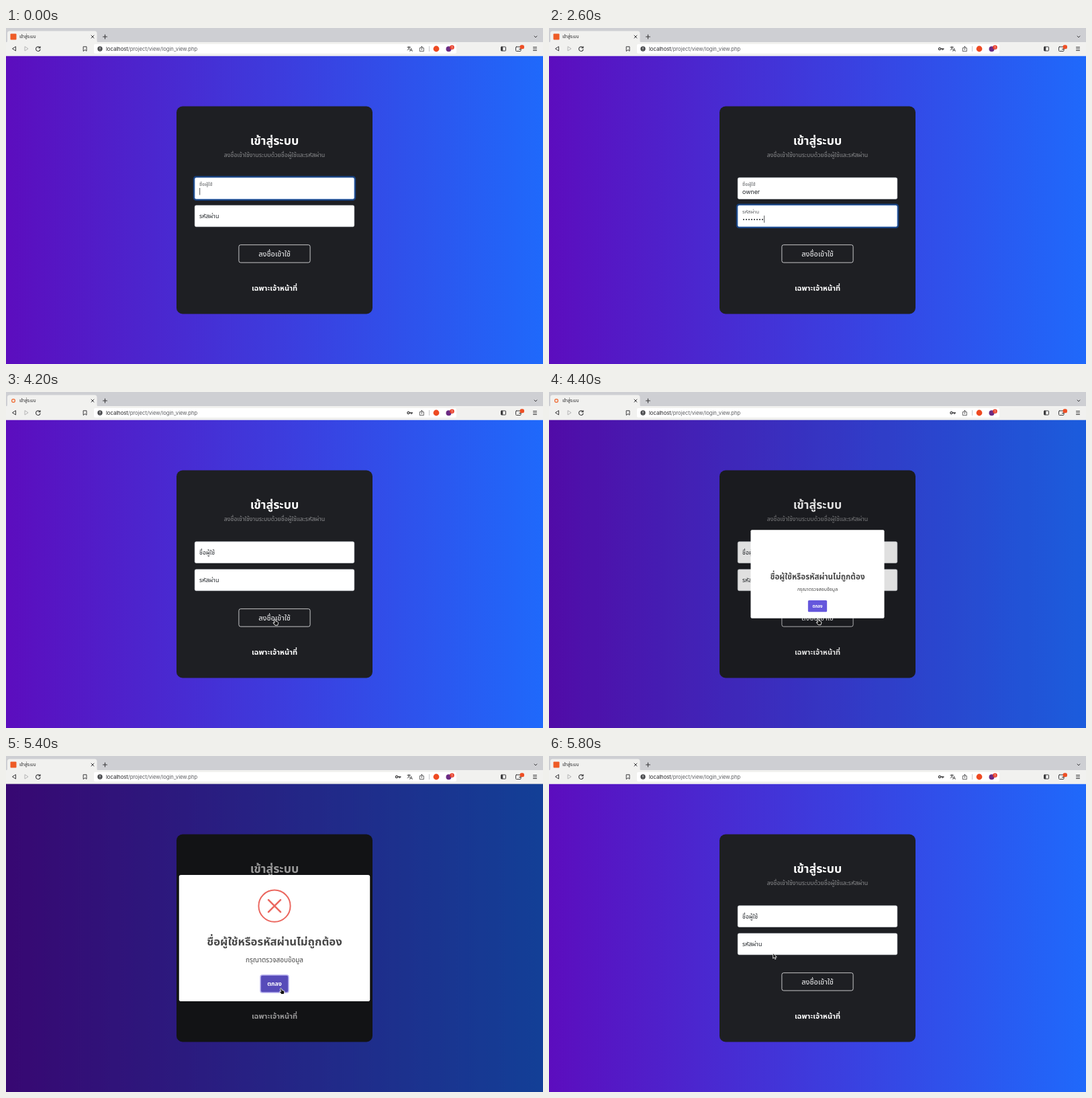
These frames come from a looping animation (800 by 500 pixels, 6000 ms). An HTML page:

```html
<!DOCTYPE html>
<html lang="th">
<head>
<meta charset="utf-8">
<title>เข้าสู่ระบบ</title>
<style>
html, body { margin: 0; width: 100%; height: 100%; overflow: hidden; }
svg { display: block; width: 800px; height: 500px; }
text { font-family: "Noto Sans Thai Looped", "Noto Sans Thai", "Noto Sans", sans-serif; }
.ui { font-family: Inter, Roboto, sans-serif; }
.mid { text-anchor: middle; }
.line { fill: none; stroke: #3b3b3d; stroke-width: 1; stroke-linecap: round; stroke-linejoin: round; }
</style>
</head>
<body>
<svg id="stage" viewBox="0 0 800 500"></svg>
<script>
const LOOP = 6000, STEP = 200;
const USER = 'owner', SECRET = 10;

// Pointer path: time, x, y, shape
const PATH = [
  [1200, 390, 262, 'beam'], [1400, 362, 276, 'beam'], [1600, 358, 284, 'beam'], [1800, 358, 284, ''],
  [3000, 358, 284, 'beam'], [3200, 374, 304, 'arrow'], [3400, 392, 313, 'arrow'],
  [3600, 400, 349.5, 'hand'], [3800, 401, 344, 'hand'], [4400, 402, 342, 'hand'],
  [4800, 402, 342, 'hand'], [5400, 411, 350, 'hand'], [5600, 412, 350, 'arrow'], [5800, 336, 298, 'arrow']
];

const clamp = (v, a = 0, b = 1) => Math.min(b, Math.max(a, v));
const mix = (a, b, k) => a + (b - a) * k;

// Piecewise linear value over [position, value] pairs
function track(p, keys) {
  const i = keys.findIndex(k => k[0] > p);
  if (i < 0) return keys[keys.length - 1][1];
  if (!i) return keys[0][1];
  const [a, b] = [keys[i - 1], keys[i]];
  return mix(a[1], b[1], (p - a[0]) / (b[0] - a[0]));
}

const rect = (x, y, w, h, r, attrs) =>
  `<rect x="${x}" y="${y}" width="${w}" height="${h}" rx="${r}" ${attrs}/>`;
const text = (x, y, size, str, attrs = '') =>
  `<text x="${x}" y="${y}" font-size="${size}" ${attrs}>${str}</text>`;
const circle = (x, y, r, attrs) => `<circle cx="${x}" cy="${y}" r="${r}" ${attrs}/>`;
const line = (d, attrs = '') => `<path class="line" d="${d}" ${attrs}/>`;

const keyIcon = x => `<g transform="translate(${x} 31)">` +
  circle(-2, 0, 1.6, 'class="line" style="stroke-width:1.3"') +
  line('M0 0H4M2.6 0V1.5', 'style="stroke-width:1.3"') + '</g>';

const translateIcon = `<g transform="translate(601.5 31)">` +
  line('M-3.5 -2.5H1M-1.3 -3.6V-2.5M.2 -2.5Q-.8 .8 -3.4 1.8M-2.6 -2.3Q-1.8 0 0 1.2M.2 3.6L2 -.8L3.8 3.6M.9 2.2H3.1',
    'style="stroke-width:.8"') + '</g>';

function browser(loading, keyX) {
  return rect(0, 0, 800, 22, 0, 'fill="#cecfd3"') +
    '<path d="M0 21.5Q2 21.5 2 19V8Q2 4.500 5.500 4.500H132Q135.500 4.500 135.500 8V19Q135.500 21.500 138 21.500Z" fill="#f1f1ef"/>' +
    rect(0, 21, 800, 20.500, 0, 'fill="#f1f1ef"') +
    (loading ? circle(11, 13, 2.4, 'fill="none" stroke="#f0682f" stroke-width="1.2"')
      : rect(6.500, 8.500, 9, 9, 1, 'fill="#ee5b26"')) +
    text(20, 15.300, 6.400, 'เข้าสู่ระบบ', 'fill="#262628" font-weight="500"') +
    line('M127 11L131 15M131 11L127 15') +
    line('M144.500 13H150.500M147.500 10V16', 'style="stroke-width:1.1"') +
    line('M787 12L789 14L791 12') +
    line('M14.500 28V34L9.800 31Z') +
    line('M28 28V34L32.700 31Z', 'style="stroke:#b4b4b5"') +
    line('M50.300 29A3.300 3.300 0 1 0 51 32M51 27.500V29.700H48.800', 'style="stroke-width:1.1"') +
    line('M115.500 27.800H120V34.300L117.750 32.500L115.500 34.300Z') +
    rect(131, 24, 540, 14, 2, 'fill="#fff"') +
    circle(140, 31, 3.700, 'fill="#4a4b4e"') +
    '<path d="M140 28.800V31.400M140 32.600V33.300" stroke="#fff"/>' +
    text(149, 33.800, 7.700, '<tspan fill="#202023">localhost</tspan>/project/view/login_view.php', 'class="ui" fill="#5d5e62"') +
    (keyX ? keyIcon(keyX) : '') + (loading ? '' : translateIcon) +
    line('M617.800 29.700H616.300V34.700H622.300V29.700H620.800M619.300 32.500V27.500M617.800 28.900L619.300 27.400L620.800 28.900', 'style="stroke-width:.8"') +
    '<path d="M630.500 27V35" stroke="#b9b9bd" stroke-width=".8"/>' +
    circle(641, 31, 4.400, 'fill="#ee4a22"') +
    circle(659.500, 31.300, 4, 'fill="#6b2b83"') +
    circle(664.500, 28.700, 3.300, 'fill="#e8412d"') +
    text(664.500, 30.500, 5, '1', 'class="ui mid" fill="#fff"') +
    rect(737.500, 28, 7, 6, .8, 'class="line"') +
    rect(737.500, 28, 2.700, 6, .5, 'fill="#3b3b3d"') +
    rect(759.500, 28, 7.500, 6.500, 1, 'class="line"') +
    line('M764.500 31.500H767') +
    rect(765.500, 25.200, 6.500, 6, 2.500, 'fill="#ee4f25"') +
    line('M785.500 28.500H790.500M785.500 31H790.500M785.500 33.500H790.500');
}

function field(y, label, focus, value, valueWidth) {
  const up = focus || value;
  return (focus ? rect(279.900, y - 1.100, 240.200, 34.400, 3.300, 'fill="none" stroke="#0d6efd" stroke-opacity=".42" stroke-width="2.200"') : '') +
    rect(281.200, y + .2, 237.600, 31.800, 2.200, `fill="#fff" stroke="${focus ? '#86b7fe' : '#ced4da'}" stroke-width=".6"`) +
    (up ? text(288, y + 12.700, 7.550, label, 'fill="#212529" fill-opacity=".72"')
      : text(288, y + 19.300, 8.900, label, 'fill="#212529" font-weight="500"')) +
    value +
    (focus ? `<path d="M${288.700 + valueWidth} ${y + 15.500}v10.500" stroke="#26282b" stroke-width=".8"/>` : '');
}

function page(s) {
  const pen = document.createElement('canvas').getContext('2d');
  pen.font = '8.9px Inter, Roboto, sans-serif';
  const name = USER.slice(0, s.typed);
  let dots = '';
  for (let i = 0; i < s.dots; i++) dots += circle(290 + i * 4, 285, 1, 'fill="#212529"');
  return rect(0, 41.500, 800, 458.500, 0, 'fill="url(#sky)"') +
    rect(254, 116.500, 292, 309, 9, 'fill="#1e1f23"') +
    text(400, 174, 17.800, 'เข้าสู่ระบบ', 'class="mid" fill="#fff" font-weight="700"') +
    text(400, 192.300, 8.900, 'ลงชื่อเข้าใช้งานระบบด้วยชื่อผู้ใช้และรหัสผ่าน', 'class="mid" fill="#8b8c8e"') +
    field(222.500, 'ชื่อผู้ใช้', s.focus === 1,
      name && text(288, 246.500, 8.900, name, 'class="ui" fill="#212529"'), pen.measureText(name).width) +
    field(263.700, 'รหัสผ่าน', s.focus === 2, dots, s.dots * 4) +
    rect(346.900, 322.700, 106.200, 26.400, 2.700, `fill="${s.hover ? '#f8f9fa' : 'none'}" stroke="#f1f2f3" stroke-width=".8"`) +
    text(400, 340, 11.100, 'ลงชื่อเข้าใช้', `class="mid" font-weight="500" fill="${s.hover ? '#212529' : '#f8f9fa'}"`) +
    text(400, 391, 11.100, 'เฉพาะเจ้าหน้าที่', 'class="mid" fill="#fff" font-weight="700"');
}

function popup(t) {
  if (t < 4400 || t >= 5800) return '';
  const age = t - 4400, leaving = t >= 5600, open = age > 0;
  const scale = leaving ? .712 : track(age / 300, [[0, .7], [.45, 1.05], [.8, .95], [1, 1]]);
  const dim = leaving ? .19 : open ? .4 : .12;
  const turn = clamp(age / 500);
  const cross = track(turn, [[.5, .4], [.8, 1.150], [1, 1]]);
  const hover = open && !leaving;
  return rect(0, 41.500, 800, 458.500, 0, `fill="#000" fill-opacity="${dim}"`) +
    `<g transform="translate(400 271) scale(${scale}) translate(-400 -271)" opacity="${leaving ? .5 : 1}">` +
    rect(257.800, 177, 284.400, 188, 2.800, 'fill="#fff"') +
    `<g transform="translate(400 223.200) scale(1 ${Math.cos((1 - turn) * 100 * Math.PI / 180)})" opacity="${turn}" fill="none" stroke="#eb675f">` +
    circle(0, 0, 23.600, 'stroke-width="2"') +
    `<path d="M-9 -9L9 9M9 -9L-9 9" stroke-width="2.600" stroke-linecap="round" transform="scale(${cross})" opacity="${turn > .5 ? 1 : 0}"/></g>` +
    text(400, 282, 16.700, 'ชื่อผู้ใช้หรือรหัสผ่านไม่ถูกต้อง', 'class="mid" fill="#484848" font-weight="600"') +
    text(400, 307.300, 10, 'กรุณาตรวจสอบข้อมูล', 'class="mid" fill="#484848"') +
    (hover ? rect(378.300, 325.200, 43.400, 27.600, 3.500, 'fill="#b5aeee"') : '') +
    rect(379.800, 326.700, 40.400, 24.600, 2.200, `fill="${hover ? '#574bb9' : '#6557dc'}"`) +
    text(400, 342, 8.900, 'ตกลง', 'class="mid" fill="#fff" font-weight="700"') + '</g>';
}

const SHAPES = {
  beam: '<path d="M-2 -4Q0 -4 0 -2.500Q0 -4 2 -4M0 -2.500V2.500M-2 4Q0 4 0 2.500Q0 4 2 4M-1 .8H1" fill="none" stroke="#111" stroke-width=".9"/>',
  arrow: '<path d="M-2.300 -4.600V3.300L-.5 1.700L.8 4.500L2.100 3.900L.9 1.200H3.300Z" fill="#111" stroke="#fff" stroke-width=".8"/>',
  hand: '<path d="M-1.800 -4.300Q-.9 -4.800 -.5 -3.800L.2 -1.500L3 -.7Q4 -.3 3.900 1L3.500 3L3 4.500H-.8L-3.500 1.200Q-3.800 .1 -2.600 .2L-1.500 1L-2.400 -3.200Q-2.500 -4 -1.800 -4.300Z" fill="#111" stroke="#fff" stroke-width=".9"/>'
};

function pointer(t) {
  const at = PATH.filter(p => p[0] <= t).pop();
  if (!at || !at[3]) return '';
  const x = track(t, PATH.map(p => [p[0], p[1]]));
  const y = track(t, PATH.map(p => [p[0], p[2]]));
  return `<g transform="translate(${x} ${y})">${SHAPES[at[3]]}</g>`;
}

function draw(t) {
  const reloaded = t >= 4200, loading = reloaded && t < 4600;
  const state = {
    typed: reloaded ? 0 : clamp(t / STEP, 0, USER.length),
    dots: reloaded ? 0 : clamp(Math.round((t - 1600) / 120), 0, SECRET),
    focus: reloaded ? 0 : t < 1600 ? 1 : 2,
    hover: t >= 3800 && !reloaded
  };
  const keyX = t < 1800 ? 0 : loading ? 601.500 : 584;
  stage.innerHTML =
    '<defs><linearGradient id="sky"><stop stop-color="#5c0dbe"/><stop offset="1" stop-color="#1f69fb"/></linearGradient></defs>' +
    page(state) + browser(loading, keyX) + popup(t) + pointer(t);
}

const stage = document.getElementById('stage');
let shown = -1;
function tick() {
  const t = Math.floor(performance.now() % LOOP / STEP) * STEP;
  if (t !== shown) draw(shown = t);
  requestAnimationFrame(tick);
}
tick();
</script>
</body>
</html>
```
